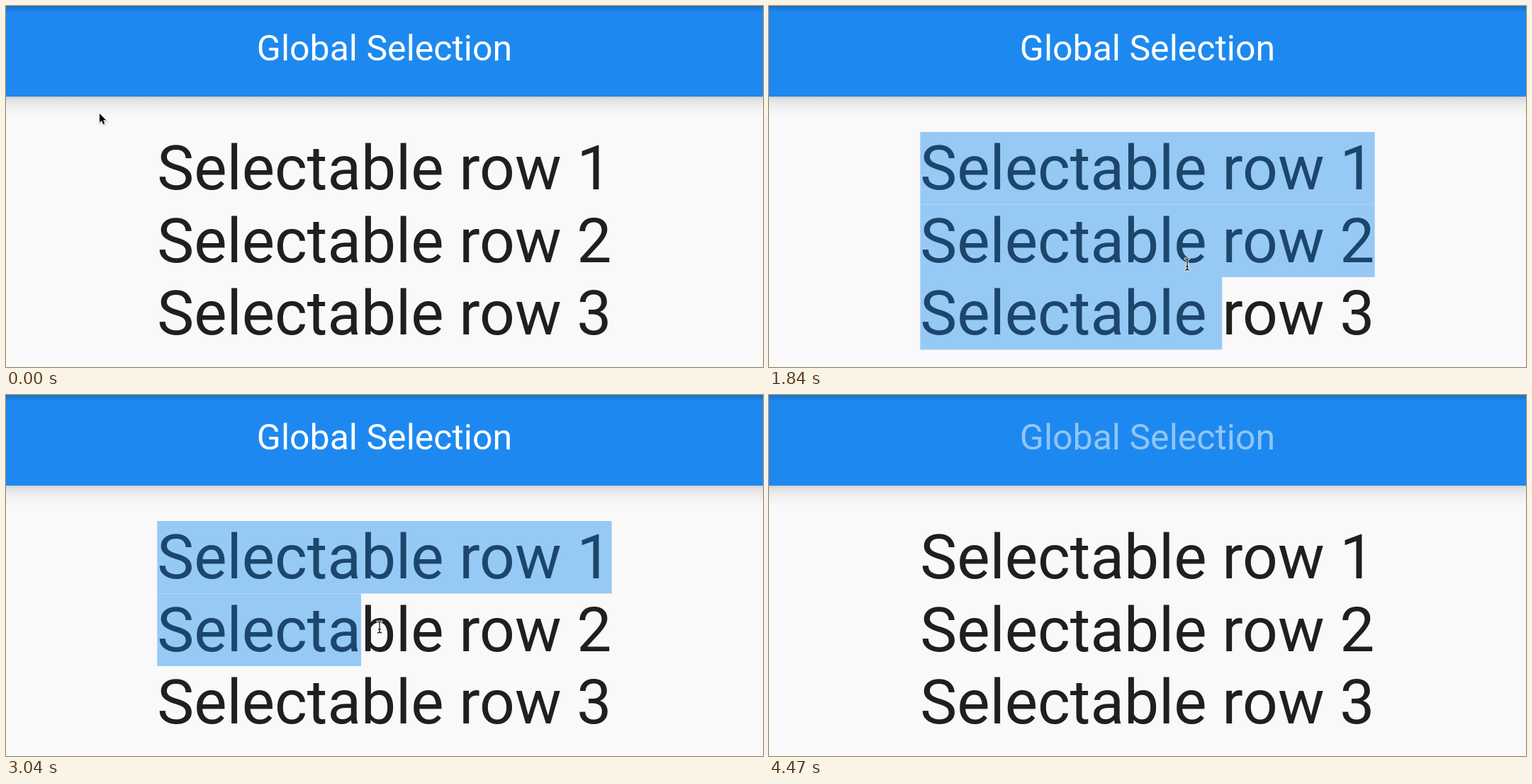
An HTML page for the animation above (4.5 s loop, 1068 by 510 pixels).

```html
<!DOCTYPE html>
<html lang="en">
<head>
<meta charset="utf-8">
<title>Global Selection</title>
<style>
  html, body { margin: 0; width: 100%; height: 100%; overflow: hidden; background: #f9f9f9; }
  svg { display: block; width: 100%; height: 100%; }
  text { font-family: Roboto, sans-serif; white-space: pre; }
  .row { font-size: 87.4px; fill: #1f1f1f; }
  .picked { fill: #1c466c; }
  #title { font-size: 50px; text-anchor: middle; fill: #fff; }
</style>
</head>
<body>
<svg id="stage" viewBox="0 0 1068 510">
  <defs>
    <linearGradient id="shade" x2="0" y2="1">
      <stop offset="0" stop-color="#cfcfcf"/>
      <stop offset=".12" stop-color="#dfdfdf"/>
      <stop offset=".4" stop-color="#ececec"/>
      <stop offset=".7" stop-color="#f3f3f3"/>
      <stop offset="1" stop-color="#f8f8f8"/>
    </linearGradient>
    <linearGradient id="topShade" x2="0" y2="1">
      <stop offset="0" stop-color="#000" stop-opacity=".17"/>
      <stop offset="1" stop-color="#000" stop-opacity="0"/>
    </linearGradient>
  </defs>
  <rect width="1068" height="510" fill="#f9f9f9"/>
  <rect y="128" width="1068" height="28" fill="url(#shade)"/>
  <rect width="1068" height="128" fill="#1d89f0"/>
  <rect width="1068" height="10" fill="url(#topShade)"/>
  <text id="title" x="534" y="77">Global Selection</text>
  <g id="rows"></g>
  <g id="arrow">
    <path d="M0 0V12.6L2.9 10L5.1 15L7.3 14L5.1 9.2H9.2Z" transform="translate(.6 1.4)" fill="none" stroke="#000" stroke-opacity=".15" stroke-width="2.5"/>
    <path d="M0 0V12.6L2.9 10L5.1 15L7.3 14L5.1 9.2H9.2Z" fill="#000" stroke="#fff" stroke-width="1.6" stroke-linejoin="round" paint-order="stroke"/>
  </g>
  <g id="beam" fill="none" stroke-linecap="round">
    <path d="M-3 -8Q0 -8 0 -6Q0 -8 3 -8M0 -6V6M-3 8Q0 8 0 6Q0 8 3 8M-1.7 3H1.7" stroke="#fff" stroke-width="3"/>
    <path d="M-3 -8Q0 -8 0 -6Q0 -8 3 -8M0 -6V6M-3 8Q0 8 0 6Q0 8 3 8M-1.7 3H1.7" stroke="#000" stroke-width="1.2"/>
  </g>
</svg>
<script>
const LOOP = 4500, LAG = 40, RELEASE = 3540, CLEAR = 3970;
const LEFT = 213.3, RIGHT = 854.6, TOP = 178, ROW_H = 102.5, BOTTOM = TOP + 3 * ROW_H;
const $ = id => document.getElementById(id);

function add(parent, name, attrs, text = '') {
  const el = document.createElementNS('http://www.w3.org/2000/svg', name);
  for (const key in attrs) el.setAttribute(key, attrs[key]);
  el.textContent = text;
  return parent.appendChild(el);
}

const rows = [0, 1, 2].map(i => {
  const top = TOP + i * ROW_H;
  const label = `Selectable row ${i + 1}`;
  const at = { x: LEFT, y: top + 81.1 };
  const box = { x: LEFT, y: top, width: 0, height: ROW_H };
  const base = add($('rows'), 'text', { ...at, class: 'row' }, label);
  const clip = add(add($('rows'), 'clipPath', { id: `clip${i}` }), 'rect', box);
  const fill = add($('rows'), 'rect', { ...box, fill: '#97c9f5' });
  add($('rows'), 'text', { ...at, class: 'row picked', 'clip-path': `url(#clip${i})` }, label);
  const stops = [...label].map((c, k) => base.getStartPositionOfChar(k).x).concat(RIGHT);
  return { clip, fill, stops };
});

// Pointer path: time, x, y
const path = [
  [0, 132, 152], [260, 133, 153], [555, 330, 250], [970, 777, 473],
  [1070, 836, 489], [1200, 890, 503], [1400, 893, 507], [1640, 860, 478],
  [1840, 590, 365], [2080, 218, 192], [2140, 202, 184], [2300, 165, 174],
  [2500, 145, 169], [2680, 145, 169], [3040, 527, 328], [3200, 700, 412],
  [3490, 866, 492], [3540, 874, 530], [3760, 903, 530], [3770, 903, 494],
  [3900, 899, 491], [4000, 898, 492], [4160, 888, 530], [LOOP, 888, 530]
];

// Monotone cubic slopes keep the path free of overshoot.
const rate = (i, d) => (path[i + 1][d] - path[i][d]) / (path[i + 1][0] - path[i][0]);
function slope(i, d) {
  if (i === 0 || i === path.length - 1) return 0;
  const a = rate(i - 1, d), b = rate(i, d);
  return a * b > 0 ? 2 * a * b / (a + b) : 0;
}

function pointer(t) {
  let i = 0;
  while (i < path.length - 2 && path[i + 1][0] <= t) i++;
  const h = path[i + 1][0] - path[i][0];
  const u = Math.max(0, (t - path[i][0]) / h), v = 1 - u;
  return [1, 2].map(d =>
    v * v * (1 + 2 * u) * path[i][d] + u * u * (3 - 2 * u) * path[i + 1][d] +
    h * u * v * (v * slope(i, d) - u * slope(i + 1, d)));
}

const nearest = (stops, x) =>
  stops.reduce((best, s) => Math.abs(s - x) < Math.abs(best - x) ? s : best);

function showSelection(t) {
  const [x, y] = pointer(Math.min(t - LAG, RELEASE));
  const current = Math.floor((y - TOP) / ROW_H);
  rows.forEach(({ clip, fill, stops }, i) => {
    let end = LEFT;
    if (t < CLEAR && i <= current) end = i < current ? RIGHT : nearest(stops, x);
    for (const r of [clip, fill]) r.setAttribute('width', Math.max(0, end - LEFT));
  });
}

function showPointer(t) {
  const [x, y] = pointer(t);
  const overText = x > LEFT && x < RIGHT && y > TOP && y < BOTTOM;
  for (const id of ['arrow', 'beam']) {
    $(id).setAttribute('transform', `translate(${x.toFixed(1)} ${y.toFixed(1)})`);
    $(id).style.display = (id === 'beam') === overText ? '' : 'none';
  }
}

function draw(now) {
  // Thirty steps a second, on ten-millisecond marks
  const step = Math.floor((now % LOOP) * 0.03 + 1e-6);
  const t = Math.ceil(step * 10 / 3 - 1e-6) * 10;
  showSelection(t);
  showPointer(t);
  $('title').style.fill = t < CLEAR ? '#fff' : '#90c5f8';
}

const start = performance.now();
function tick() {
  draw(performance.now() - start);
  requestAnimationFrame(tick);
}
tick();
</script>
</body>
</html>
```
